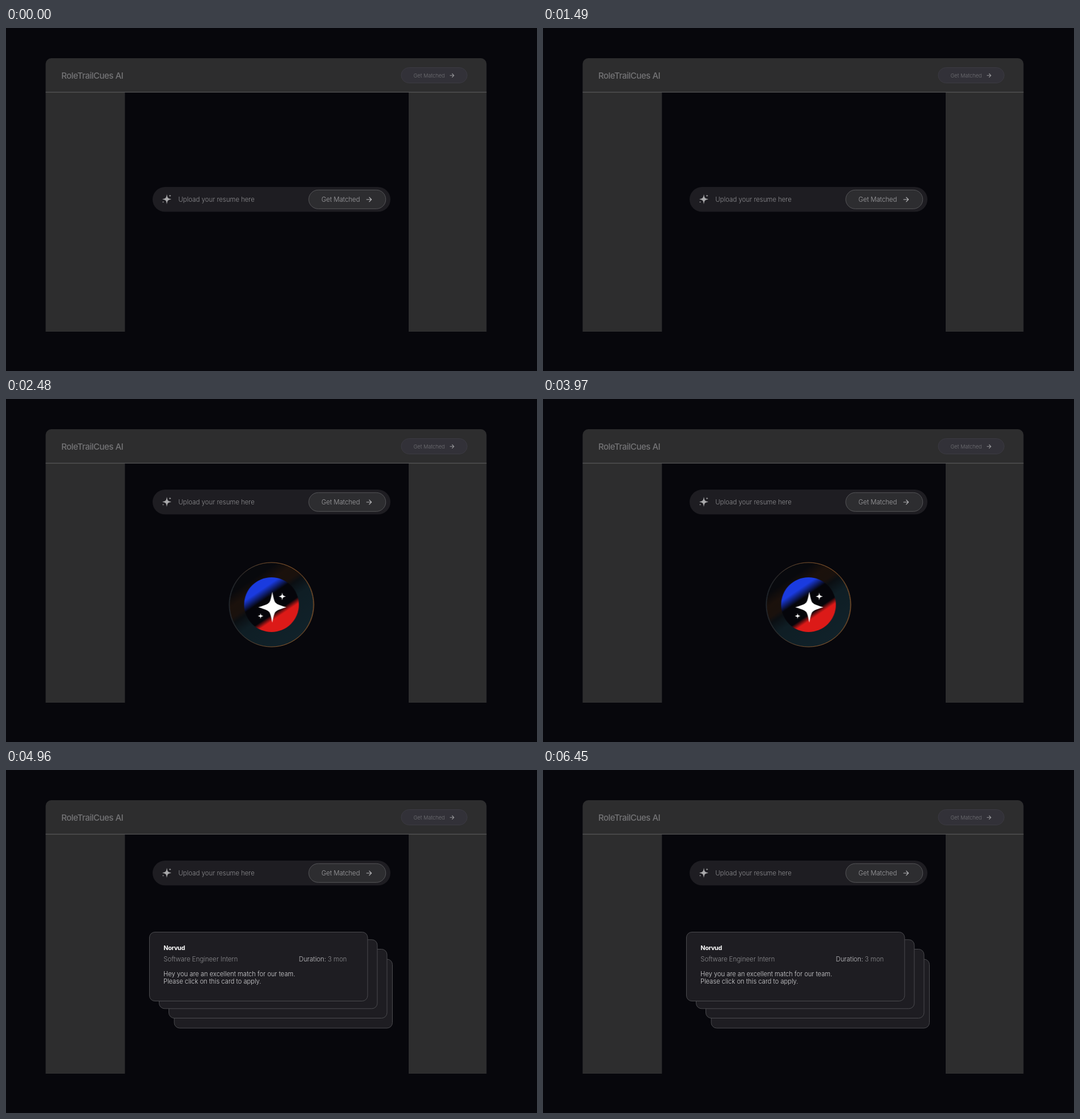
Recreate the animation shown at these times as an HTML page. Size 931 by 602 pixels, loop 7.44 s.

```html
<!DOCTYPE html>
<html lang="en">
<head>
<meta charset="utf-8">
<title>Resume matching</title>
<style>
  html, body { margin: 0; width: 100%; height: 100%; overflow: hidden; background: #07070c; }
  svg { display: block; width: 931px; height: 602px; }
  text { font: 300 11.3px Inter, "Open Sans", sans-serif; fill: #8e8e91; }
  .brand { font-size: 15px; font-weight: 500; letter-spacing: -.5px; fill: #747476; }
  .small { font-size: 9.2px; fill: #737377; }
  .cta { fill: #a2a2a5; }
  .company { font-size: 10.8px; font-weight: 700; letter-spacing: -.35px; fill: #fff; }
  .note { font-size: 11.1px; fill: #d6d6d8; }
  .panel { fill: #2d2d2e; }
  .arrow { fill: none; stroke-linecap: round; stroke-linejoin: round; }
  .card { fill: #1e1d22; stroke: #4b4b4f; }
</style>
</head>
<body>
<svg viewBox="0 0 931 602">
  <defs>
    <path id="star" d="M0-27C3-12 4-9 7-7C9-5 12-4 24.5 0C12 4 9 5 7 7C4 9 3 12 0 27C-3 12-4 9-7 7C-9 5-12 4-24.5 0C-12-4-9-5-7-7C-4-9-3-12 0-27Z"/>
    <g id="sparkles">
      <use href="#star"/>
      <use href="#star" transform="translate(17.5 -19) scale(.25)"/>
      <use href="#star" transform="translate(-20.5 15.5) scale(.19)"/>
    </g>
    <path id="arrow" class="arrow" d="M-4.2 0H4.2M.4-3.8L4.2 0L.4 3.8"/>
    <linearGradient id="halo" gradientUnits="userSpaceOnUse" x1="-41.4" y1="-61.4" x2="41.4" y2="61.4">
      <stop offset=".12" stop-color="#08090d"/>
      <stop offset=".25" stop-color="#1b110c"/>
      <stop offset=".37" stop-color="#1a110d"/>
      <stop offset=".43" stop-color="#0b0f13"/>
      <stop offset=".57" stop-color="#0f1e25"/>
      <stop offset="1" stop-color="#11222a"/>
    </linearGradient>
    <linearGradient id="core" gradientUnits="userSpaceOnUse" x1="-26.9" y1="-39.8" x2="26.9" y2="39.8">
      <stop offset=".17" stop-color="#1a3bdf"/>
      <stop offset=".35" stop-color="#05050a"/>
      <stop offset=".65" stop-color="#05050a"/>
      <stop offset=".75" stop-color="#dc1a18"/>
    </linearGradient>
    <linearGradient id="rim">
      <stop offset="0" stop-color="#34404a"/>
      <stop offset=".4" stop-color="#75502f"/>
      <stop offset="1" stop-color="#bd7434"/>
    </linearGradient>
  </defs>

  <rect width="931" height="602" fill="#07070c"/>
  <path class="panel" d="M69.5 113V63a10 10 0 0 1 10-10H832.5a10 10 0 0 1 10 10V113Z"/>
  <path class="panel" d="M69.5 113H208.5V533H69.5ZM706 113H842.5V533H706Z"/>
  <path d="M69.5 112.7H842.5" stroke="#606062"/>
  <text class="brand" x="97" y="88.6">RoleTrailCues AI</text>
  <rect x="693" y="69.5" width="115.5" height="27" rx="13.5" fill="#323138" stroke="#3b3a42"/>
  <text class="small" x="714.5" y="86.5">Get Matched</text>
  <use href="#arrow" transform="translate(782 83.3) scale(.8)" stroke="#98989b" stroke-width="1.4"/>

  <g id="search">
    <rect x="257" y="279" width="417" height="43.6" rx="21.8" fill="#1e1d22"/>
    <use href="#sparkles" transform="translate(282 300.5) scale(.32)" fill="#aaaaac"/>
    <text x="302.3" y="305">Upload your resume here</text>
    <rect x="530.8" y="284.3" width="135" height="33" rx="16.5" fill="#2d2d30" stroke="#555558"/>
    <text class="cta" x="553" y="305">Get Matched</text>
    <use href="#arrow" transform="translate(636.5 301)" stroke="#b5b5b8" stroke-width="1.2"/>
  </g>

  <g id="orb" transform="translate(465.5 361)" opacity="0">
    <circle r="74" fill="url(#halo)" stroke="url(#rim)"/>
    <circle r="48" fill="url(#core)"/>
    <use href="#sparkles" x="1.4" y="4.4" fill="#fff"/>
  </g>

  <g id="cards" opacity="0">
    <g id="stack"></g>
    <text class="company" x="276.3" y="316">Norvud</text>
    <text x="276.3" y="336">Software Engineer Intern</text>
    <text x="513.5" y="336"><tspan fill="#c4c4c7">Duration:</tspan> 3 mon</text>
    <text class="note" x="276" y="361.6">Hey you are an excellent match for our team.</text>
    <text class="note" x="276" y="375.2">Please click on this card to apply.</text>
  </g>
</svg>
<script>
  const LOOP = 7440;
  const $ = id => document.getElementById(id);

  // Back card first, front card last.
  for (const [x, y] of [[295, 332], [285.5, 314.5], [268.5, 297.8], [251.5, 284.5]]) {
    const card = document.createElementNS("http://www.w3.org/2000/svg", "rect");
    const attrs = { class: "card", x, y, width: 382.5, height: 121, rx: 9.5 };
    for (const key in attrs) card.setAttribute(key, attrs[key]);
    $("stack").append(card);
  }

  // One value per third of the loop, switched without blending.
  function cut(id, prop, values) {
    const steps = [...values, values[2]].map((value, i) => ({
      [prop]: value, offset: i / 3, easing: "step-end"
    }));
    return $(id).animate(steps, { duration: LOOP, iterations: Infinity });
  }

  const tracks = [
    cut("search", "transform", ["translateY(0px)", "translateY(-120px)", "translateY(-120px)"]),
    cut("orb", "opacity", [0, 1, 0]),
    cut("cards", "opacity", [0, 0, 1])
  ];
  for (const track of tracks) track.startTime = document.timeline.currentTime;
</script>
</body>
</html>
```
